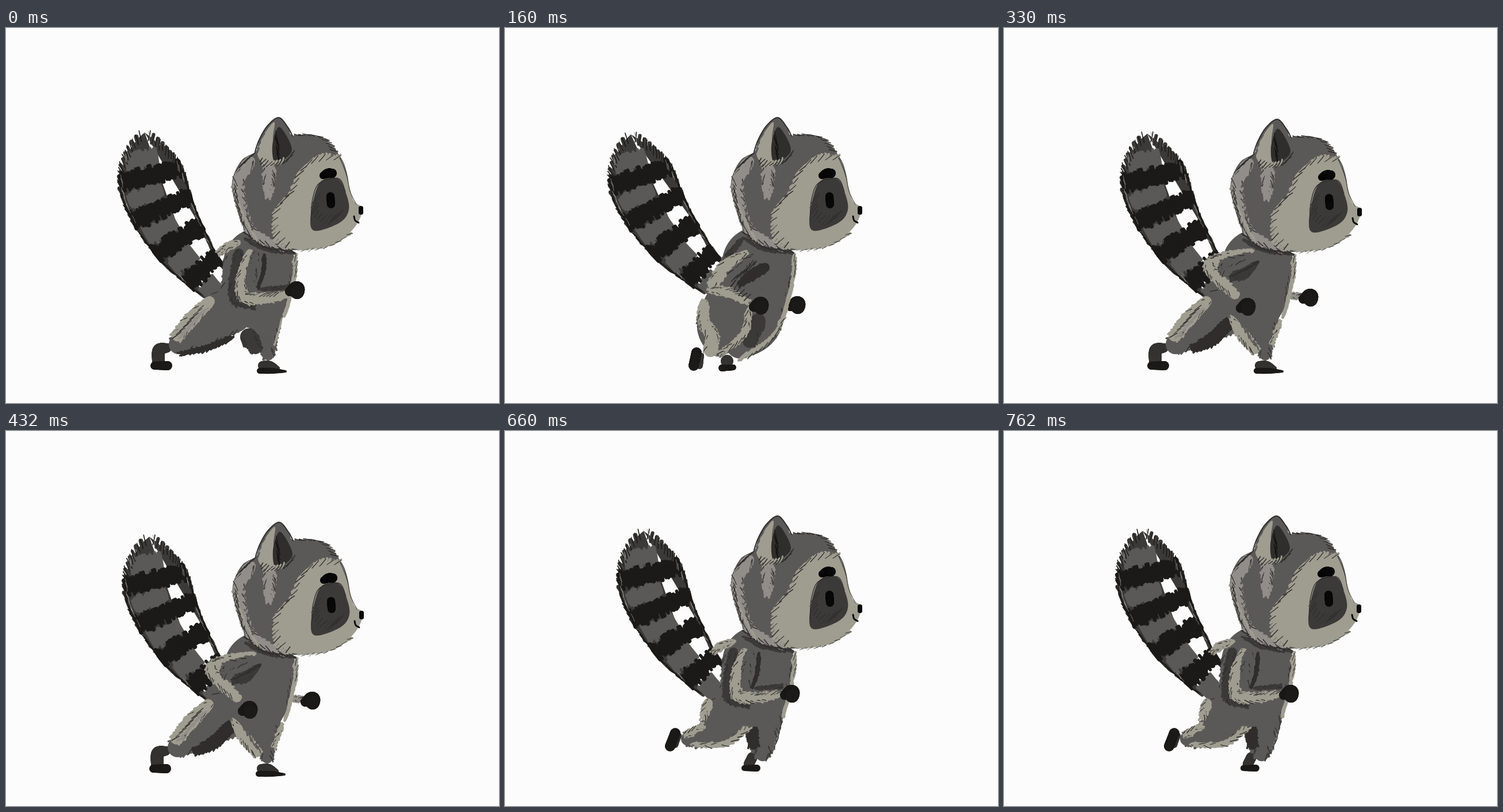
Animation of 857x653 px, one loop 830 ms. Source, as an HTML page with a canvas:

```html
<!DOCTYPE html>
<html lang="en">
<head>
<meta charset="utf-8">
<title>Running raccoon</title>
<style>
  html, body { margin: 0; overflow: hidden; background: #fcfcfc; }
  canvas { display: block; }
</style>
</head>
<body>
<canvas id="stage" width="857" height="653"></canvas>
<script>
const ctx = document.getElementById('stage').getContext('2d');
const GRAY = '#5a5957', LIGHT = '#9e9d90', TAUPE = '#918e8a', DARK = '#3b3a38',
      SHADE = '#302e2c', INK = '#1b1a18', BLACK = '#080808';

let seed = 1;
const rand = () => (seed = seed * 16807 % 2147483647) / 2147483647;
const vary = amount => (rand() - .5) * amount;

// Catmull-Rom spline through "x,y x,y ..." (or "x,y,radius ...") as dense points
function curve(text, closed) {
  const knots = text.split(' ').map(knot => knot.split(',').map(Number));
  const n = knots.length, points = [];
  const at = i => knots[closed ? (i + n) % n : Math.max(0, Math.min(n - 1, i))];
  for (let i = 0; i < (closed ? n : n - 1); i++) {
    const [a, b, c, d] = [at(i - 1), at(i), at(i + 1), at(i + 2)];
    for (let t = 0; t < .99; t += .05)
      points.push(b.map((p, k) => p + .5 * t * (c[k] - a[k] +
        t * (2 * a[k] - 5 * p + 4 * c[k] - d[k] + t * (3 * (p - c[k]) + d[k] - a[k])))));
  }
  if (!closed) points.push(knots[n - 1]);
  return points;
}

function trace(points) {
  ctx.beginPath();
  for (const [x, y] of points) ctx.lineTo(x, y);
}

function fill(color, points) {
  trace(points);
  ctx.fillStyle = color;
  ctx.fill();
}

const shape = (color, text) => fill(color, curve(text, true));

function line(color, width, text) {
  trace(curve(text));
  ctx.strokeStyle = color;
  ctx.lineWidth = width;
  ctx.stroke();
}

// One slightly bent hair centred on x, y
function hair(color, width, x, y, dx, dy) {
  const size = .35 + rand() * .3, bend = vary(4);
  const hx = dx * size + vary(2), hy = dy * size + vary(2);
  ctx.strokeStyle = color;
  ctx.lineWidth = width * (.7 + rand() * .5);
  ctx.beginPath();
  ctx.moveTo(x - hx, y - hy);
  ctx.quadraticCurveTo(x + bend, y - bend / 2, x + hx, y + hy);
  ctx.stroke();
}

// Hairs of one direction along a curve
function fur(color, text, dx, dy, width = 4, gap = 6) {
  let walked = 0, last;
  for (const [x, y] of curve(text)) {
    if (last) walked += Math.hypot(x - last[0], y - last[1]);
    last = [x, y];
    if (walked < gap) continue;
    walked = 0;
    hair(color, width, x, y, dx, dy);
  }
}

// Tapered rounded form along a spine of "x,y,radius" knots, hairy on both sides
function limb(color, text, length = 11) {
  const spine = curve(text);
  ctx.fillStyle = color;
  for (const [x, y, r] of spine) {
    ctx.beginPath();
    ctx.arc(x, y, r, 0, 7);
    ctx.fill();
  }
  if (!length) return;
  for (let i = 1; i < spine.length; i += 3) {
    const [x, y, r] = spine[i], [px, py] = spine[i - 1];
    const angle = Math.atan2(y - py, x - px);
    for (const side of [-1, 1]) {
      const normal = angle + side * Math.PI / 2, lean = angle + side * .35;
      const ex = x + Math.cos(normal) * (r - 2), ey = y + Math.sin(normal) * (r - 2);
      const dx = Math.cos(lean) * length, dy = Math.sin(lean) * length;
      hair(color, 4, ex, ey, dx, dy);
      if (rand() < .4) hair(SHADE, 1.4, ex, ey, dx, dy);
    }
  }
}

function at(x, y, draw) {
  ctx.save();
  ctx.translate(x, y);
  draw();
  ctx.restore();
}

// The tail: u runs from tip to base, v from the left edge (-1) to the right (1)
const tailAxis = u => [241 * (1 - u) ** 2 + 490 * u * (1 - u) + 368 * u * u,
                       182 * (1 - u) ** 2 + 660 * u * (1 - u) + 450 * u * u];
const tailWidth = u => u < .33 ? 60 * Math.sin(u / .33 * Math.PI / 2) ** .85
                               : 60 - 30 * ((u - .33) / .67) ** 1.6;

function tailSpot(u, v) {
  const [x, y] = tailAxis(u), [nx, ny] = tailAxis(u + .01);
  const step = Math.hypot(nx - x, ny - y), dx = (nx - x) / step, dy = (ny - y) / step;
  const w = v * tailWidth(u);
  return { x: x + dy * w, y: y - dx * w, dx, dy };
}

function tailHair(color, width, u, v, length, lean = 0) {
  const { x, y, dx, dy } = tailSpot(u, v);
  hair(color, width, x, y, (dx - dy * lean) * length, (dy + dx * lean) * length);
}

function tailBand(color, u, from, to, length) {
  for (let v = from; v <= to; v += .07) tailHair(color, 7, u + vary(.015), v, length);
}

function tail(x, y, degrees) {
  seed = 71;
  ctx.save();
  ctx.translate(345 + x, 465 + y);
  ctx.rotate(degrees * Math.PI / 180);
  ctx.translate(-345, -465);
  const outline = [];
  for (let i = -40; i <= 40; i++) {
    const { x, y } = tailSpot(1 - Math.abs(i) / 40, i < 0 ? -.94 : .94);
    i < 0 ? outline.push([x, y]) : outline.unshift([x, y]);
  }
  fill(DARK, outline);
  for (let u = .04; u < 1; u += .03)
    for (const side of [-1, 1]) tailHair(DARK, 7, u, side * .92, 15, side * .2);
  const stripe = k => .26 + .207 * k;
  for (let k = 0; k < 5; k++) tailBand(GRAY, stripe(k - .5), -.8, k ? .2 : .4, 25);
  for (let k = 0; k < 4; k++) tailBand(INK, stripe(k), -.92, .92, 25);
  for (let u = .02; u < .97; u += .02)
    for (const side of [-1, 1]) {
      tailHair(INK, 1.5, u, side * .96, 16, side * .25);
      if (rand() < .2) tailHair(TAUPE, 1, u, side * .9, 12);
    }
  ctx.restore();
}

function ear() {
  shape(LIGHT, '437,220 443,196 457,173 467,165 464,194 468,235 450,238');
  shape(SHADE, '470,178 478,174 493,198 496,216 480,231 466,232 463,205');
  fur(BLACK, '470,184 472,205 473,226', 7, 22, 1, 5);
  fur(GRAY, '436,224 441,200 452,180', -3, 9, 2, 9);
  fur(LIGHT, '442,234 458,237 484,231', -5, 8, 3, 5);
  fur(SHADE, '440,226 455,237 485,233 500,215', -7, 7, 1.5, 5);
  line(SHADE, 2, '433,215 440,195 454,171 474,156 490,173 498,188');
}

function face() {
  const edge = '500,384 471,362 470,318 497,284 513,250 540,228 578,226';
  shape(LIGHT, edge + ' 592,258 604,300 619,314 609,343 578,373 545,383');
  fur(LIGHT, edge, -9, 9, 5, 5);
  fur(SHADE, edge, -11, 10, 1.3, 12);
  fur(LIGHT, '506,386 557,379 600,357', 11, -4, 3, 6);
  fur(DARK, '506,388 560,381 603,355', 9, -4, 1, 11);
  line(SHADE, 1, '580,226 592,256 598,284 609,307');
  shape(DARK, '545,270 576,262 590,285 596,316 580,339 536,353 530,325');
  fur(SHADE, '540,290 538,320 560,335 584,322', 12, -14, 1.2, 6);
  line(SHADE, 1.3, '530,335 533,298 545,270 578,262 590,285');
  limb(BLACK, '564,293,7 565,307,7', 0);
  limb(BLACK, '551,257,6 559,253,8 567,253,8', 0);
  limb(BLACK, '617,314,4 617,321,4', 0);
  line(BLACK, 3, '605,328 607,335 613,339');
}

function head(x, y) {
  seed = 29;
  at(x, y, () => {
    shape(GRAY, '434,215 440,196 454,172 474,156 491,175 498,187 530,187 562,203 589,240 594,300 560,370 500,387 450,381 417,356 396,296 394,262 410,230');
    limb(TAUPE, '424,232,9 405,268,10 411,315,8 430,357,8 480,383,4', 13);
    fur(LIGHT, '400,262 406,310 436,370', 4, 12, 3, 9);
    fur(SHADE, '397,258 405,320 418,350', 6, 13, 1.5, 9);
    fur(SHADE, '402,246 416,232 430,220', -9, 11, 1.8, 5);
    fur(GRAY, '416,255 421,310 432,345', -6, 13, 3, 10);
    limb(TAUPE, '457,246,11 457,270,9 456,292,4');
    fur(GRAY, '502,189 548,194 571,218', 14, 4, 4, 7);
    fur(SHADE, '500,186 548,190 572,216', 15, 4, 1.6, 6);
    ear();
    face();
    fur(SHADE, '414,354 446,380 500,389', 11, 5, 2, 6);
  });
}

const paw = (x, y) => at(x, y, () => limb(INK, '-9,3,8 3,-2,13 4,4,12', 0));

function foot(top, sole) {
  limb('#343331', top, 0);
  limb(INK, sole, 0);
}

function chest() {
  fur(LIGHT, '501,395 503,415 498,450 485,500', -4, 13, 6, 5);
  fur(DARK, '501,392 505,415 502,435', -3, 12, 1.2, 9);
  fur(DARK, '414,364 448,385 496,391', 10, 4, 5, 6);
}

function crouchTorso() {
  limb(GRAY, '440,410,62 432,465,58');
  chest();
}

// Far shoulder, then the near arm folded in front of the belly
function foldedArm() {
  limb(LIGHT, '403,374,5 385,381,7 371,391,4', 9);
  limb(DARK, '405,392,8 396,435,7 398,472,8 430,483,5');
  limb(LIGHT, '424,392,7 411,430,9 413,467,10 450,471,8 486,465,5');
  limb(GRAY, '435,394,8 429,420,9 427,448,8');
  limb(SHADE, '449,398,3 447,425,3 439,450,2', 8);
  limb(DARK, '445,455,3 488,452,4', 8);
}

function stretchedLegs() {
  foot('280,557,8 266,561,11 265,580,11', '258,588,7 281,588,8');
  limb(GRAY, '390,490,42 345,520,33 300,551,17');
  limb(LIGHT, '354,476,9 324,505,12 298,536,10');
  fur(SHADE, '345,480 318,512 292,540', -14, 10, 1.5, 8);
  fur(TAUPE, '350,485 328,510 302,540', -12, 9, 4, 9);
  foot('446,588,8 459,587,7 472,593,4', '441,597,5 462,597,5 486,598,2');
  limb(GRAY, '445,485,38 453,540,19 456,570,9');
}

function stride() {
  stretchedLegs();
  limb(SHADE, '390,540,4 350,557,5 306,567,3');
  limb(DARK, '422,538,15 434,558,10');
  crouchTorso();
  fur(LIGHT, '480,506 469,545', -4, 13, 3, 6);
  foldedArm();
  paw(502,456);
}

function reach() {
  limb(TAUPE, '498,466,6 514,467,5', 6);
  paw(529, 469);
  at(-2, 0, stretchedLegs);
  limb(SHADE, '392,512,10 362,542,11 330,558,6');
  at(1, 2, crouchTorso);
  limb(LIGHT, '396,506,5 413,532,10 436,560,8');
  fur(GRAY, '408,510 440,556', 4, 12, 3, 7);
  limb(LIGHT, '479,514,3 466,548,4');
  limb(DARK, '438,410,4 418,427,9 396,434,5');
  limb(LIGHT, '428,389,5 385,399,9 358,414,11 375,438,10 403,466,6');
  limb(GRAY, '426,397,6 385,412,9 384,428,5');
  fur(SHADE, '390,434 418,422 440,407', 13, -5, 2, 7);
  paw(420, 485);
}

// Upright torso, the far hand and the far leg's foot
function passing() {
  paw(505, 482);
  foot('386,580,11', '377,592,6 397,591,5');
  limb(GRAY, '440,408,62 428,465,62 430,512,50 410,548,28');
  chest();
  limb(DARK, '410,370,4 388,396,5', 9);
  fur(LIGHT, '484,503 462,541 410,575', -9, 10, 6, 5);
  fur(DARK, '487,500 465,543 425,572', -8, 11, 1.5, 9);
}

function swingingArm() {
  limb(SHADE, '452,417,8 426,432,9 408,445,4', 8);
  limb(LIGHT, '418,392,5 385,414,11 361,446,9');
  limb(GRAY, '430,399,7 397,432,11');
  limb(LIGHT, '356,456,6 390,461,8 420,476,4');
  fur(SHADE, '440,405 415,425 396,442 422,470', -8, 9, 2, 6);
}

function passNear() {
  foot('342,570,4 338,588,6', '333,565,9 328,588,9');
  passing();
  limb(DARK, '440,510,13 425,545,12');
  limb(GRAY, '385,485,40 377,520,43 370,555,17');
  limb(LIGHT, '346,480,8 345,510,10 360,535,11 357,562,11');
  limb(LIGHT, '424,492,5 415,532,6 375,567,4');
  swingingArm();
  paw(441, 483);
}

function passFar() {
  foot('346,568,4 342,586,6', '338,559,9 332,582,8');
  at(0, -3, passing);
  limb(GRAY, '385,482,40 378,515,38 372,555,17');
  limb(LIGHT, '351,480,9 349,510,9 363,535,12 362,560,11');
  limb(SHADE, '372,472,5 380,515,7 387,565,7');
  limb(LIGHT, '384,478,7 396,515,11 398,560,10');
  at(16, 0, swingingArm);
  paw(461, 473);
}

function kick() {
  foot('303,530,4 296,547,5', '296,526,9 287,549,9');
  foot('430,568,9 424,580,9', '416,587,5 438,587,6');
  limb(GRAY, '446,478,42 446,530,26 448,563,12');
  limb(SHADE, '429,518,10 432,546,9');
  limb(GRAY, '395,488,45 360,525,25 318,536,12');
  limb(LIGHT, '353,474,8 345,499,5');
  limb(LIGHT, '317,528,7 342,514,4');
  limb(LIGHT, '328,546,4 385,544,5 431,508,5');
  at(0, -8, crouchTorso);
  fur(DARK, '482,504 470,548 456,568', -3, 13, 1.8, 8);
  at(-8, -7, foldedArm);
  paw(495, 457);
}

const poses = [
  { end: 160, body: stride,   tail: [0, 0, 0],    head: [0, 0] },
  { end: 330, body: passNear, tail: [2, -7, -5],  head: [0, 0] },
  { end: 500, body: reach,    tail: [8, 2, 0],    head: [1, 3] },
  { end: 660, body: passFar,  tail: [2, -11, -5], head: [0, -4] },
  { end: 830, body: kick,     tail: [0, -8, 0],   head: [0, -8] },
];

let shown;
function frame() {
  const time = performance.now() % 830;
  const pose = poses.find(p => time < p.end);
  if (pose !== shown) {
    shown = pose;
    ctx.fillStyle = '#fcfcfc';
    ctx.fillRect(0, 0, 857, 653);
    tail(...pose.tail);
    seed = 53;
    pose.body();
    head(...pose.head);
  }
  requestAnimationFrame(frame);
}

ctx.lineCap = ctx.lineJoin = 'round';
frame();
</script>
</body>
</html>
```
